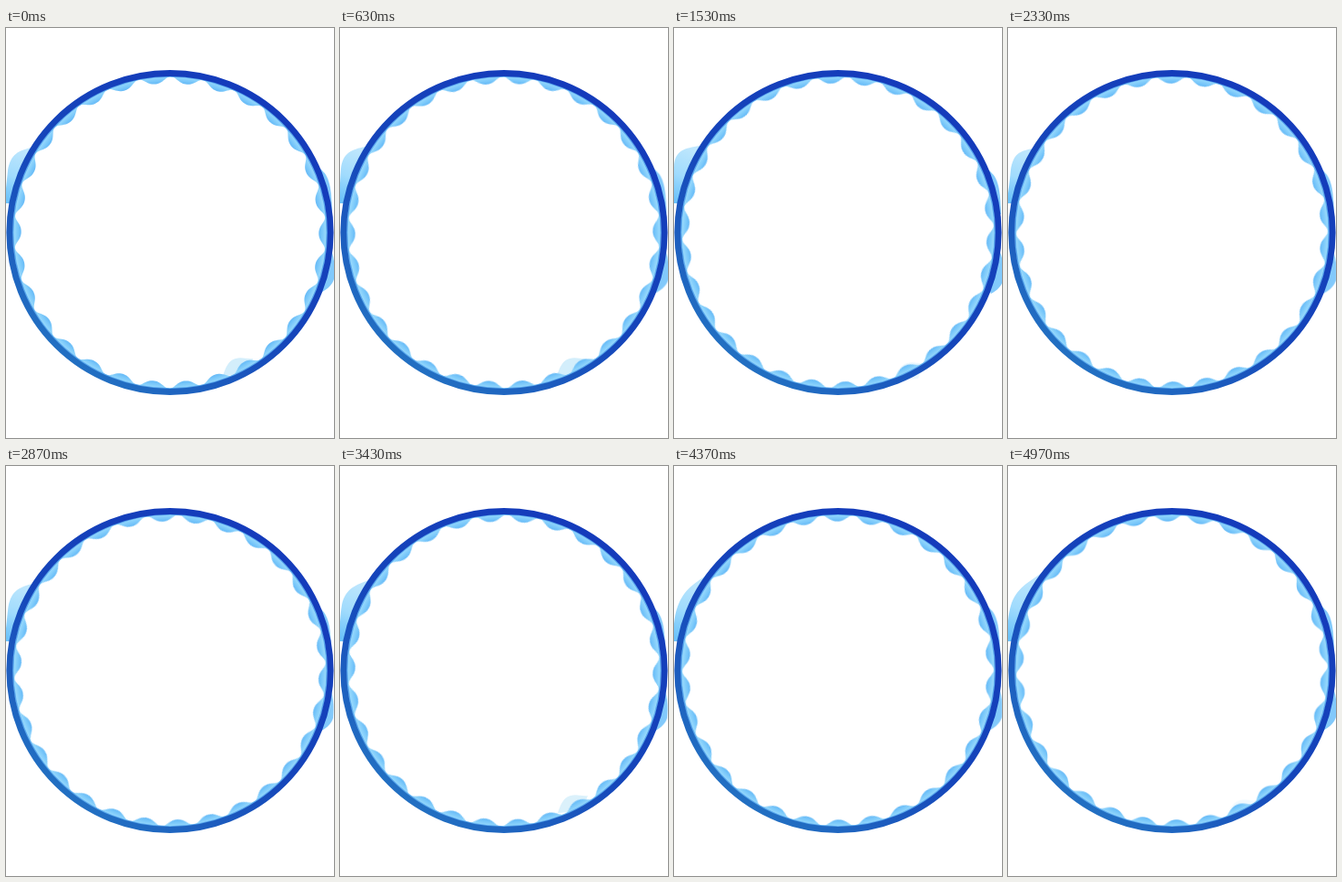
These frames come from a looping animation (360x449 px, 5000 ms). An HTML page:

```html
<!DOCTYPE html>
<html lang="en">
<head>
<meta charset="utf-8">
<title>Water ring</title>
<style>
  html, body { margin: 0; width: 100%; height: 100%; overflow: hidden; background: #fff; }
  svg { display: block; width: 360px; height: 449px; }

  #wave { transform-origin: 180px 224px; animation: spin 5s linear infinite; }
  #swell { animation: swell 5s linear infinite; }
  #foam { animation: foam 5s linear infinite; }
  #bulge { animation: bulge 5s ease-in-out infinite; }

  @keyframes spin { to { transform: rotate(88.6deg); } }

  @keyframes swell {
    0%   { d: path("M28 131 C14 134 5 138 2 156 C1 166 0 176 -2 192 L24 192 Z"); }
    13%  { d: path("M28 130 C12 133 3 137 1 154 C0 166 0 176 -2 192 L24 192 Z"); }
    31%  { d: path("M28 129 C12 132 1 133 0 152 C-1 166 -1 176 -2 192 L24 192 Z"); }
    47%  { d: path("M27 132 C13 135 6 137 3 156 C2 166 1 178 -2 192 L24 192 Z"); }
    69%  { d: path("M32 125 C18 130 6 134 2 152 C0 164 0 176 -2 192 L24 192 Z"); }
    87%  { d: path("M35 120 C22 129 11 135 4 154 C0 164 0 176 -2 192 L24 192 Z"); }
    100% { d: path("M37 117 C23 127 9 133 3 153 C0 164 -1 178 -2 192 L24 192 Z"); }
  }

  @keyframes foam {
    0%, 13%   { opacity: 1; transform: none; }
    31%       { opacity: .45; transform: translate(4px, 5px); }
    40%, 56%  { opacity: 0; transform: translate(4px, 6px); }
    68%, 72%  { opacity: .8; transform: translate(1px, -1px); }
    84%, 96%  { opacity: 0; transform: translate(4px, 6px); }
    100%      { opacity: .4; transform: translate(2px, 4px); }
  }

  @keyframes bulge {
    0%, 100% { transform: none; }
    31%      { transform: translate(1px, 2px); }
    60%      { transform: translate(-1px, 1px); }
  }
</style>
</head>
<body>
<svg viewBox="0 0 360 449">
  <defs>
    <linearGradient id="rim" x1=".8" y1=".1" x2=".2" y2=".9">
      <stop offset="0" stop-color="#143bbb"/>
      <stop offset=".55" stop-color="#1545ba"/>
      <stop offset="1" stop-color="#226fc2"/>
    </linearGradient>
    <linearGradient id="pale" x1=".6" y1="0" x2=".4" y2="1">
      <stop offset="0" stop-color="#bfe7fd"/>
      <stop offset=".55" stop-color="#a0dbfd"/>
      <stop offset="1" stop-color="#6cc3fa"/>
    </linearGradient>
    <radialGradient id="water" gradientUnits="userSpaceOnUse" cx="180" cy="224" r="173">
      <stop offset=".938" stop-color="#5eb5f6"/>
      <stop offset=".965" stop-color="#7cc9fa"/>
      <stop offset="1" stop-color="#a4e0fd"/>
    </radialGradient>
  </defs>

  <path id="swell" fill="url(#pale)" d="M28 131 C14 134 5 138 2 156 C1 166 0 176 -2 192 L24 192 Z"/>
  <g id="bulge" fill="#82c9fb">
    <path d="M343 153 C354 160 357 170 358 202 L340 200 Z"/>
    <path d="M354 238 C361 248 361 262 360 275 C358 281 354 285 347 289 L338 270 Z"/>
  </g>

  <ellipse cx="180" cy="224" rx="175" ry="174" fill="#fff"/>
  <path id="foam" fill="#d3eefb" d="M238 381 C241 372 244 364 252 362 C259 360 265 363 271 362 L264 379 Z"/>
  <path id="wave" fill="url(#water)" fill-rule="evenodd"/>
  <ellipse cx="180" cy="224" rx="172.3" ry="171" fill="none" stroke="#5aa9ee" stroke-width="1.6"/>
  <ellipse cx="180" cy="224" rx="176.2" ry="174.5" fill="none" stroke="url(#rim)" stroke-width="6.8"/>
</svg>
<script>
  const CX = 180, CY = 224, BUMPS = 30, STEPS = 720;

  // Closed outline of points at radius(angle) around the centre.
  function outline(radius) {
    const pts = [];
    for (let i = 0; i < STEPS; i++) {
      const a = i / STEPS * 2 * Math.PI, r = radius(a);
      pts.push((CX + r * Math.cos(a)).toFixed(2) + " " + (CY + r * Math.sin(a)).toFixed(2));
    }
    return "M" + pts.join("L") + "Z";
  }

  const scallop = a => {
    const p = BUMPS * (a - 0.005);
    return 166.6 - 3.8 * Math.cos(p) + 0.5 * Math.cos(2 * p);
  };
  document.getElementById("wave").setAttribute("d", outline(() => 173) + outline(scallop));
</script>
</body>
</html>
```
